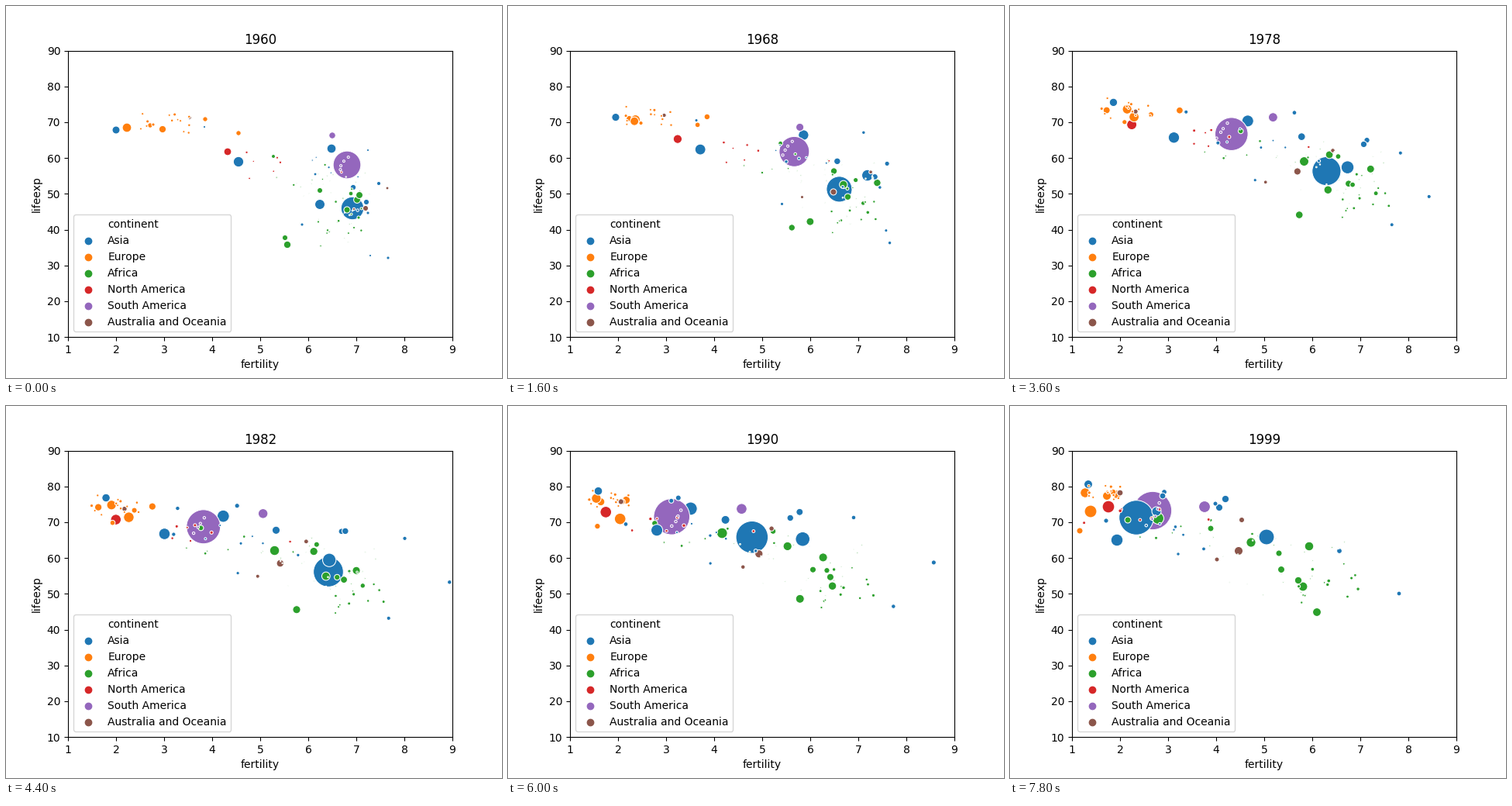
These frames come from a looping animation (640x480 px, 8 s). A matplotlib script:

```python
import matplotlib.pyplot as plt
import numpy as np
from matplotlib.animation import FuncAnimation

plt.rcParams["text.kerning_factor"] = 6

START, YEARS = 1960, 40
GROUPS = ["Asia", "Europe", "Africa", "North America", "South America",
          "Australia and Oceania"]
AS, EU, AF, NA, SA, OC = range(6)

rng = np.random.default_rng(11)
colors, sizes, paths = [], [], []


def smooth(points):
    """Hermite curve through points evenly spaced in time, one row per year."""
    p = np.array(points, float)
    slope = np.gradient(p, axis=0)
    t = np.linspace(0, len(p) - 1, YEARS)
    i = np.minimum(t.astype(int), len(p) - 2)
    u = (t - i)[:, None]
    return ((1 + 2 * u) * (1 - u) ** 2 * p[i] + u * (1 - u) ** 2 * slope[i]
            + u * u * (3 - 2 * u) * p[i + 1] + u * u * (u - 1) * slope[i + 1])


def bubble(group, first, last, *points):
    """One country: area at both ends and a few stage positions in pixels."""
    x, y = smooth(points).T
    colors.append(f"C{group}")
    sizes.append(np.linspace(first, last, YEARS))
    paths.append(np.column_stack([1 + (x - 80) / 62, 10 + (427.2 - y) / 4.62]))


def cloud(group, count, areas, growth, *stops):
    """Small countries that keep their place in a drifting, reshaping swarm.

    Each stop is the swarm's centre and spread: x, y, dx, dy.
    """
    stops = np.array(stops, float)
    for _ in range(count):
        place = rng.uniform(-1, 1, 2) + rng.normal(0, 0.15, (len(stops), 2))
        area = rng.uniform(*areas)
        bubble(group, area, area * growth, *(stops[:, :2] + place * stops[:, 2:]))


# Countries covered by the largest bubble
bubble(AS, 9, 18, (493, 325), (493, 279), (502, 242))
bubble(NA, 50, 130, (286, 188), (183, 162), (131, 141), (127, 130))
bubble(AS, 72, 172, (420, 184), (371, 163), (296, 146), (240, 133), (184, 130))

bubble(SA, 662, 1265, (440, 205), (327, 177), (229, 148), (184, 135))
bubble(SA, 38, 115, (421, 167), (353, 150), (320, 135), (251, 130))

bubble(EU, 22, 63, (186, 154), (122, 133), (125, 116))
bubble(EU, 73, 82, (156, 157), (164, 140), (123, 123), (97, 112))
bubble(EU, 21, 62, (257, 146), (248, 140), (165, 125), (138, 114))
bubble(EU, 22, 30, (300, 164), (175, 138), (133, 111))
bubble(EU, 45, 132, (202, 159), (158, 147), (160, 143), (147, 146), (104, 136))
bubble(EU, 9, 34, (190, 153), (144, 150), (90, 161))

bubble(AS, 450, 1030, (447, 261), (428, 237), (405, 214), (410, 211), (295, 163), (163, 144))
bubble(AS, 88, 207, (405, 256), (469, 213), (428, 206), (384, 173), (331, 169))

bubble(AF, 13, 33, (345, 194), (341, 168), (213, 154), (152, 147))
bubble(AF, 40, 115, (453, 250), (413, 217), (312, 174), (191, 145))
bubble(AF, 26, 78, (405, 238), (423, 200), (380, 184), (311, 176))
bubble(AF, 27, 74, (360, 299), (374, 267), (378, 233))
bubble(AF, 46, 70, (363, 308), (403, 259), (412, 205), (386, 181))
bubble(AF, 17, 33, (445, 242), (443, 212), (374, 167), (259, 158))
bubble(AF, 42, 62, (456, 244), (478, 225), (461, 210), (421, 230), (396, 266))
bubble(AF, 34, 46, (440, 263), (437, 237), (430, 221), (372, 225))
bubble(AF, 9, 42, (455, 273), (455, 243), (411, 214), (350, 211))
bubble(AF, 5, 34, (449, 286), (469, 238), (347, 190))

bubble(AS, 52, 62, (142, 160), (132, 122), (101, 101))
bubble(AS, 5, 24, (256, 156), (225, 135), (199, 111))
bubble(AS, 93, 126, (300, 201), (239, 182), (208, 168), (195, 160), (138, 173))
bubble(AS, 5, 32, (467, 186), (435, 150), (245, 122), (197, 116))
bubble(AS, 8, 20, (399, 217), (325, 190), (175, 157), (124, 148))
bubble(AS, 14, 44, (481, 229), (484, 188), (401, 152), (270, 131))
bubble(AS, 28, 74, (448, 234), (405, 182), (317, 153), (189, 136))
bubble(AS, 27, 46, (465, 253), (471, 200), (412, 147), (278, 120))
bubble(AS, 9, 19, (467, 267), (487, 213), (500, 155), (265, 126))
bubble(AS, 5, 24, (470, 322), (504, 269), (580, 212), (425, 187))
bubble(AS, 9, 10, (382, 282), (310, 221), (217, 191))

bubble(OC, 11, 32, (237, 144), (158, 135), (142, 112))
bubble(OC, 26, 64, (464, 261), (394, 227), (338, 195), (295, 187))
bubble(OC, 8, 26, (492, 235), (448, 201), (361, 165), (299, 147))
bubble(OC, 6, 19, (449, 262), (345, 237), (317, 213), (267, 198))

cloud(EU, 13, (4, 9), 1.1, (205, 150, 40, 14), (140, 132, 32, 12), (118, 112, 24, 10))
cloud(AF, 13, (2, 7), 1.7, (430, 275, 28, 28), (455, 245, 35, 28), (415, 228, 48, 28))
cloud(AF, 6, (2, 6), 1.5, (400, 225, 45, 30), (310, 190, 70, 25), (225, 165, 75, 25))
cloud(AS, 6, (3, 7), 2.0, (425, 225, 40, 35), (330, 180, 70, 20), (215, 170, 40, 18))
cloud(NA, 7, (3, 6), 2.0, (375, 200, 85, 25), (300, 165, 95, 22), (205, 138, 85, 18))
cloud(SA, 4, (4, 5), 1.3, (436, 200, 12, 9), (265, 155, 12, 11), (190, 135, 11, 13))
cloud(AF, 26, (0.8, 1.7), 1.2, (425, 255, 45, 45), (415, 215, 70, 40), (345, 205, 90, 40))

paths, sizes = np.array(paths), np.array(sizes)

fig, ax = plt.subplots(figsize=(6.4, 4.8), dpi=100)
swarm = ax.scatter(*paths[:, 0].T, s=sizes[:, 0], c=colors,
                   edgecolors="w", linewidths=0.75)
ax.scatter([], [], color="w", label="continent")
for g, name in enumerate(GROUPS):
    ax.scatter([], [], color=f"C{g}", label=name)
ax.set(xlim=(1, 9), ylim=(10, 90), xlabel="fertility", ylabel="lifeexp")
ax.legend(loc="lower left")
title = ax.set_title(str(START))


def draw(i):
    swarm.set_offsets(paths[:, i])
    swarm.set_sizes(sizes[:, i])
    title.set_text(str(START + i))
    return swarm, title


anim = FuncAnimation(fig, draw, frames=YEARS, interval=200, repeat=True,
                     repeat_delay=0, blit=False)
plt.show()
```
